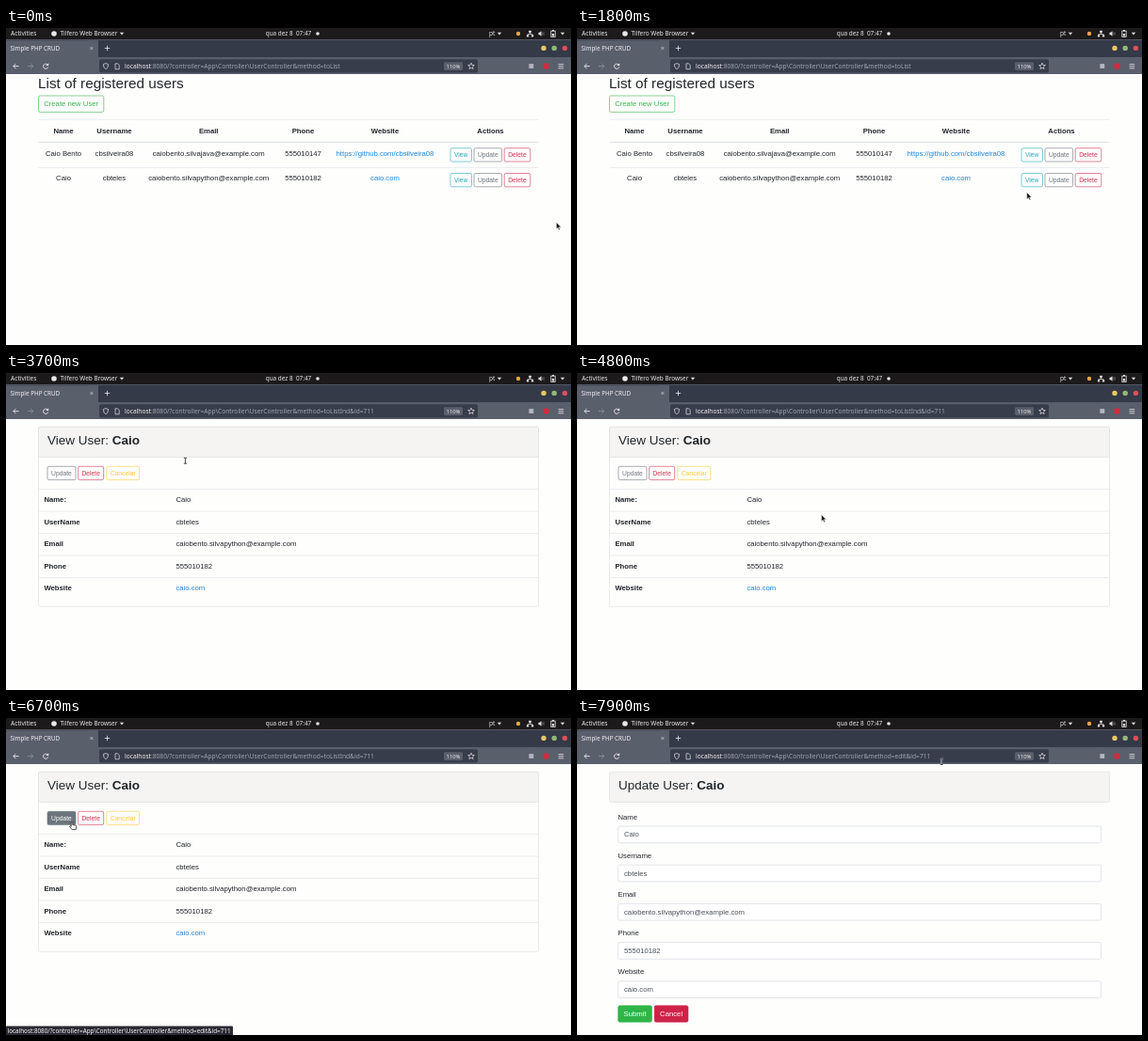
An HTML page for the animation above (8000 ms loop, 600x337 px).

```html
<!DOCTYPE html>
<html lang="en">
<head>
<meta charset="utf-8">
<title>Simple PHP CRUD</title>
<style>
  html, body { margin: 0; width: 100%; height: 100%; overflow: hidden; background: #fefefd; }
  svg { display: block; width: 100vw; height: 100vh; }
  text { white-space: pre; }
  .ui { font-family: "Noto Sans", "Open Sans", sans-serif; }
  .page { font-family: "Liberation Sans", Arial, sans-serif; }
</style>
</head>
<body>
<svg id="stage" viewBox="0 0 600 337" xmlns="http://www.w3.org/2000/svg"></svg>
<script>
const LOOP = 8000, STEP = 100;
const INK = '#212529', LINE = '#dee2e6', LINK = '#1a86de';
const TEAL = '#2ba9b8', GREY = '#6c757d', RED = '#cf3352', GREEN = '#37b34e', YELLOW = '#ffc93c';
const BASE = 7.73, SMALL = 6.76;

const user = {
  name: 'Caio', login: 'cbteles', mail: 'caiobento.silvapython@example.com',
  phone: '555010182', site: 'caio.com'
};
const other = {
  name: 'Caio Bento', login: 'cbsilveira08', mail: 'caiobento.silvajava@example.com',
  phone: '555010147', site: 'https://github.com/cbsilveira08'
};

const HOST = 'localhost';
const path = method => ':8080/?controller=App\\Controller\\UserController&method=' + method;
const LIST = path('toList'), VIEW = path('toListInd&id=711'), EDIT = path('edit&id=711');

const stage = document.getElementById('stage');

function add(parent, tag, attrs, content) {
  const el = document.createElementNS('http://www.w3.org/2000/svg', tag);
  for (const key in attrs) el.setAttribute(key, attrs[key]);
  if (content !== undefined) el.textContent = content;
  parent.appendChild(el);
  return el;
}
const group = (parent, attrs = {}) => add(parent, 'g', attrs);
const rect = (p, x, y, width, height, fill, more = {}) =>
  add(p, 'rect', { x, y, width, height, fill, ...more });
const text = (p, x, y, str, size = BASE, fill = INK, more = {}) =>
  add(p, 'text', { x, y, 'font-size': size, fill, ...more }, str);
const dot = (p, cx, cy, r, fill) => add(p, 'circle', { cx, cy, r, fill });
const stroke = (p, d, color, width = 0.9, more = {}) =>
  add(p, 'path', { d, fill: 'none', stroke: color, 'stroke-width': width, ...more });
const fill = (p, d, color) => add(p, 'path', { d, fill: color });
const hline = (p, y, width = 0.6) => stroke(p, `M34.5 ${y}H565.5`, LINE, width);
const show = (el, on) => el.setAttribute('display', on ? 'inline' : 'none');

const MID = { 'text-anchor': 'middle' };
const BOLD = { 'font-weight': 'bold' };

// Button whose look can be switched between outline, filled and focused.
function button(p, x, y, w, h, label, color, size = SMALL) {
  const ring = rect(p, x - 1, y - 1, w + 2, h + 2, 'none',
    { rx: 2.3, stroke: color, 'stroke-opacity': 0.5, 'stroke-width': 1.4, display: 'none' });
  const box = rect(p, x, y, w, h, 'none', { rx: 1.7, stroke: color, 'stroke-width': 0.6 });
  const tag = text(p, x + w / 2, y + h / 2 + size * 0.33, label, size, color, MID);
  return (filled, focused) => {
    box.setAttribute('fill', filled ? color : 'none');
    tag.setAttribute('fill', filled ? '#fff' : color);
    show(ring, focused);
  };
}

function drawList() {
  const g = group(stage, { class: 'page' });
  text(g, 34, 64, 'List of registered users', 15.3);
  button(g, 34.5, 72, 69.3, 17.4, 'Create new User', GREEN, BASE);
  hline(g, 97.4);
  hline(g, 121.5, 1);
  hline(g, 148.5);
  const cols = [61, 115, 215.2, 315.5, 402.5, 514.5];
  ['Name', 'Username', 'Email', 'Phone', 'Website', 'Actions']
    .forEach((head, i) => text(g, cols[i], 112.1, head, BASE, INK, { ...MID, ...BOLD }));
  let view;
  [other, user].forEach((u, row) => {
    const y = 135.6 + row * 26.8;
    Object.values(u).forEach((v, i) => text(g, cols[i], y, v, BASE, i === 4 ? LINK : INK, MID));
    view = button(g, 472, y - 7.9, 22.5, 14.3, 'View', TEAL);
    button(g, 497, y - 7.9, 29.6, 14.3, 'Update', GREY);
    button(g, 529.2, y - 7.9, 27.6, 14.3, 'Delete', RED);
  });
  return { g, view };
}

function cardHead(g, verb) {
  rect(g, 34.5, 57.3, 531, 32.2, '#f5f4f3', { rx: 1.9, stroke: '#dcdcdc', 'stroke-width': 0.6 });
  const title = text(g, 44, 76, verb + ' User: ', 13.5);
  add(title, 'tspan', BOLD, user.name);
}

function drawDetail() {
  const g = group(stage, { class: 'page' });
  rect(g, 34.5, 57.3, 531, 191, 'none', { rx: 1.9, stroke: '#dcdcdc', 'stroke-width': 0.6 });
  cardHead(g, 'View');
  const update = button(g, 44, 99.3, 30, 14.3, 'Update', GREY);
  button(g, 76.7, 99.3, 27, 14.3, 'Delete', RED);
  button(g, 106.8, 99.3, 34.9, 14.3, 'Cancelar', YELLOW);
  const values = Object.values(user);
  ['Name:', 'UserName', 'Email', 'Phone', 'Website'].forEach((label, i) => {
    const y = 137.4 + i * 23.5;
    hline(g, y - 13.9);
    text(g, 40.4, y, label, BASE, INK, BOLD);
    text(g, 180.4, y, values[i], BASE, i === 4 ? LINK : INK);
  });
  return { g, update };
}

function drawForm() {
  const g = group(stage, { class: 'page' });
  cardHead(g, 'Update');
  const values = Object.values(user);
  ['Name', 'Username', 'Email', 'Phone', 'Website'].forEach((label, i) => {
    const y = 41.2 * i;
    text(g, 43.5, 107.5 + y, label);
    rect(g, 43.6, 115 + y, 513, 17.7, '#fff', { rx: 1.9, stroke: '#ced4da', 'stroke-width': 0.6 });
    text(g, 50, 126.3 + y, values[i], BASE, '#495057');
  });
  button(g, 43.7, 305.8, 35.8, 17.4, 'Submit', '#2eb548', BASE)(true, false);
  button(g, 82.2, 305.8, 35.8, 17.4, 'Cancel', '#cf2347', BASE)(true, false);
  return { g };
}

function drawChrome() {
  const g = group(stage, { class: 'ui' });
  const pale = '#e8e8ea', soft = '#b4b7c0', panel = '#5a5f6c';
  // Desktop bar
  rect(g, 0, 0, 600, 12.2, '#1c1a1a');
  text(g, 5, 8.2, 'Activities', 6.6, pale);
  dot(g, 51, 6, 2.8, pale);
  text(g, 57.5, 8.2, 'Tilfero Web Browser', 6.45, pale);
  text(g, 300, 8.2, 'qua dez 8  07:47', 6.4, pale, MID);
  dot(g, 331, 6, 1.8, pale);
  text(g, 513, 8.2, 'pt', 6.5, pale);
  [123, 524, 591].forEach(x => fill(g, `M${x - 2.2} 4.8h4.4l-2.2 2.6z`, pale));
  dot(g, 544, 6, 2.2, '#e9a545');
  stroke(g, 'M556.5 4.5V6.5M554 8V6.5H559V8', pale, 0.7);
  rect(g, 555.2, 2.8, 2.6, 2.2, pale);
  rect(g, 552.9, 7.4, 2.3, 2, pale);
  rect(g, 557.9, 7.4, 2.3, 2, pale);
  fill(g, 'M565.5 4.8h1.4l1.6-1.6v5.6l-1.6-1.6h-1.4z', pale);
  stroke(g, 'M569.6 4.6q1.2 1.4 0 2.8', soft, 0.6);
  stroke(g, 'M570.8 3.6q2 2.4 0 4.8', '#66666a', 0.6);
  rect(g, 578.8, 3.2, 4.4, 6.2, 'none', { stroke: pale, 'stroke-width': 0.8 });
  rect(g, 580, 2, 2, 1.2, pale);
  rect(g, 579.8, 6, 2.4, 2.6, pale);
  // Tab strip
  rect(g, 0, 12.2, 600, 18.8, '#343a48');
  rect(g, 0, 13.4, 98, 17.6, panel);
  const title = text(g, 4.5, 23.9, '', 6.3, '#f1f1f4');
  const busy = dot(g, 9, 21.5, 1.2, '#a4a8b2');
  rect(g, 87, 13.4, 11, 17.6, panel);
  stroke(g, 'M89.4 20l3 3m0-3l-3 3', pale, 0.6);
  stroke(g, 'M104.8 21.5h5.4m-2.7-2.7v5.4', pale, 0.8);
  ['#e8c764', '#93b878', '#dd5058'].forEach((c, i) => dot(g, 571 + 11.2 * i, 21.4, 2.7, c));
  // Toolbar
  rect(g, 0, 31, 600, 18, panel);
  stroke(g, 'M13.6 40.6H8M10.4 38L7.8 40.6L10.4 43.2', pale);
  stroke(g, 'M23 40.6H28.6M26.2 38L28.8 40.6L26.2 43.2', '#8d919c');
  const reload = group(g);
  stroke(reload, 'M44.4 39.4A2.6 2.6 0 1 0 44.7 41.4', pale);
  fill(reload, 'M45.2 37.2v2.8h-2.8z', pale);
  const stop = stroke(g, 'M40 38.8l3.6 3.6', pale);
  rect(g, 99, 33.2, 402, 14.4, '#383d4b', { rx: 1.8 });
  stroke(g, 'M106 37.6l2.6 .9q0 4.2-2.6 5.4q-2.6-1.2-2.6-5.4z', pale, 0.7);
  stroke(g, 'M116 37.8h2.6l1.6 1.6v4.4h-4.2z', pale, 0.7);
  const url = text(g, 126, 42.8, '', 6.64, '#a2a5af');
  add(url, 'tspan', { fill: '#f0f0f4' }, HOST);
  const rest = add(url, 'tspan', {}, '');
  rect(g, 465, 36.2, 20, 8.8, panel, { rx: 1.4 });
  text(g, 475, 42.6, '110%', 5.8, pale, MID);
  let star = 'M';
  for (let i = 0; i < 10; i++) {
    const a = i * Math.PI / 5, r = i % 2 ? 1.6 : 3.5;
    star += `${494 + r * Math.sin(a)} ${40.7 - r * Math.cos(a)} `;
  }
  stroke(g, star + 'z', pale, 0.7);
  rect(g, 555.4, 38.1, 4.8, 4.8, soft);
  dot(g, 573.5, 40.6, 3.3, '#cc2f3e');
  stroke(g, 'M586.6 38.6h5.6m-5.6 2.1h5.6m-5.6 2.1h5.6', pale, 0.8);

  return (address, loading) => {
    title.textContent = loading ? 'localhost:8080/?controlle' : 'Simple PHP CRUD';
    title.setAttribute('x', loading ? 14.5 : 4.5);
    rest.textContent = address;
    show(busy, loading);
    show(stop, loading);
    show(reload, !loading);
  };
}

function drawStatus() {
  const g = group(stage, { class: 'ui' });
  const box = rect(g, -1, 327.4, 0, 10.6, '#2b2a33', { rx: 1 });
  const label = text(g, 1.6, 334.6, '', 6.3, '#f4f4f6');
  return (str, width) => {
    show(g, str);
    label.textContent = str;
    box.setAttribute('width', width + 1);
  };
}

function drawPointers() {
  const edge = { stroke: '#fff', 'stroke-width': 0.5, 'stroke-linejoin': 'round' };
  const arrow = group(stage);
  add(arrow, 'path', { d: 'M0 0V7.2L1.7 5.7L2.8 8.2L4 7.7L2.9 5.2H5.1Z', fill: '#161616', ...edge });
  const hand = group(stage);
  add(hand, 'path', {
    d: 'M-.8 .3Q0-.6 .8 .3V3.1L4.1 3.7Q4.9 4 4.7 5L4.1 8.2H.2L-2.3 5.2Q-2.5 4.3-1.6 4.3L-.8 5Z',
    fill: '#fff', stroke: '#222', 'stroke-width': 0.8, 'stroke-linejoin': 'round'
  });
  const beam = group(stage);
  stroke(beam, 'M-1.6-3H1.6M0-3V3M-1.6 3H1.6', '#fff', 1.5);
  stroke(beam, 'M-1.6-3H1.6M0-3V3M-1.6 3H1.6', '#222', 0.8);
  return { arrow, hand, beam };
}

const list = drawList(), detail = drawDetail(), form = drawForm();
const setChrome = drawChrome(), setStatus = drawStatus(), pointers = drawPointers();

// Pointer path: time, x, y
const route = [
  [0, 584.4, 206.6], [800, 584.4, 206.6], [1800, 477.7, 174.7], [2050, 480, 165],
  [2400, 481, 163.2], [2600, 481, 163.2], [3400, 192, 92], [3700, 190.4, 93.2],
  [4400, 216, 251], [4800, 259.5, 150.5], [5300, 226, 136], [5450, 226, 136],
  [6400, 70, 110.5], [7300, 70, 110.5], [7900, 387.3, 46.4]
];
const shapes = [
  [0, 'arrow'], [2000, 'hand'], [2600, 'arrow'], [3400, 'beam'], [3900, 'arrow'],
  [6400, 'hand'], [7400, 'arrow'], [7800, 'beam']
];

function pointerAt(t) {
  const i = route.findIndex(k => k[0] > t);
  if (i < 0) return route[route.length - 1].slice(1);
  const [t0, x0, y0] = route[i - 1], [t1, x1, y1] = route[i];
  const u = (t - t0) / (t1 - t0), e = u * u * (3 - 2 * u);
  return [x0 + (x1 - x0) * e, y0 + (y1 - y0) * e];
}

function render(t) {
  const within = (a, b) => t >= a && t < b;
  const loading = within(2300, 2500) || within(7200, 7400);
  const overView = within(2000, 2500), overUpdate = within(6400, 7400);

  show(list.g, t < 2500);
  show(detail.g, within(2500, 7400));
  show(form.g, t >= 7400);
  list.view(overView, overView && loading);
  detail.update(overUpdate, overUpdate && loading);

  setChrome(t < 2300 ? LIST : t < 7200 ? VIEW : EDIT, loading);
  if (loading) setStatus(HOST, 142);
  else if (overView) setStatus(HOST + VIEW, 255);
  else if (overUpdate) setStatus(HOST + EDIT, 241);
  else setStatus('', 0);

  const kind = shapes.filter(s => s[0] <= t).pop()[1];
  const [x, y] = pointerAt(t);
  for (const name in pointers) show(pointers[name], name === kind);
  pointers[kind].setAttribute('transform', `translate(${x.toFixed(2)} ${y.toFixed(2)})`);
}

const start = performance.now();
function tick() {
  const t = (performance.now() - start) % LOOP;
  render(Math.floor(t / STEP) * STEP);
  requestAnimationFrame(tick);
}
tick();
</script>
</body>
</html>
```
